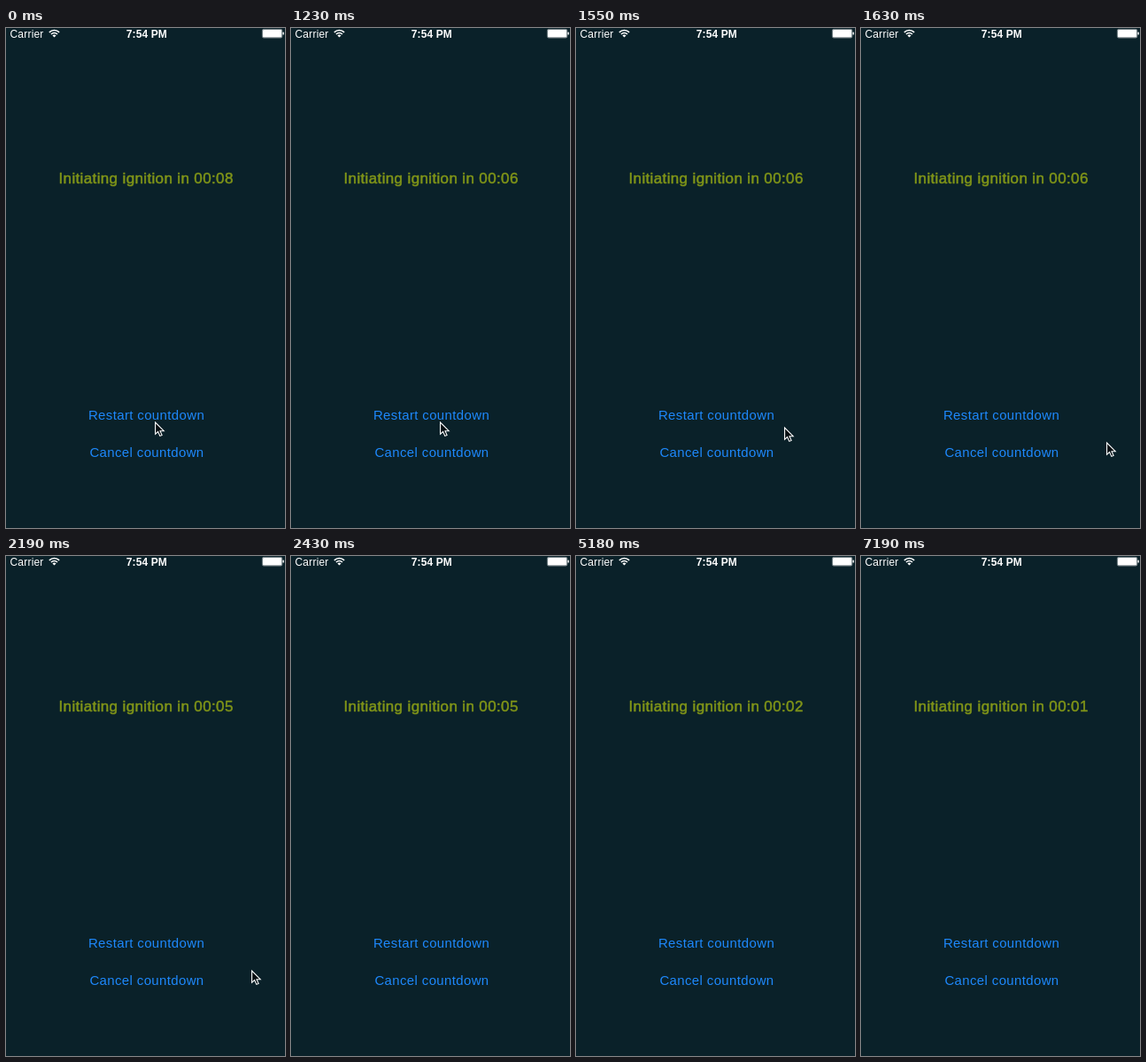
Recreate the animation shown at these times as an HTML page with a canvas. Size 315 by 563 pixels, loop 8 s.

```html
<!DOCTYPE html>
<html lang="en">
<head>
<meta charset="utf-8">
<title>Countdown</title>
<style>
html, body { margin: 0; width: 100%; height: 100%; overflow: hidden; background: #0a2129; }
canvas { display: block; width: 315px; height: 563px; }
</style>
</head>
<body>
<canvas id="stage"></canvas>
<script>
const W = 315, H = 563, LOOP = 8000;
const BG = '#0a2129', GREEN = '#809518', BLUE = '#1e88fb', WHITE = '#fff';
const SANS = '"Liberation Sans", Arial, sans-serif';

// [start ms, seconds left]
const counts = [[0, 8], [210, 7], [1230, 6], [2190, 5], [4200, 4], [5180, 2], [7190, 1]];
// [start ms, x, y]; no position once the pointer has left
const pointer = [
  [0, 168, 443], [1500, 188, 443], [1520, 213, 445], [1550, 235, 449],
  [1580, 254, 456], [1600, 268, 462], [1630, 277, 466], [2400, 296, 466], [2430]
];

const canvas = document.getElementById('stage');
const ctx = canvas.getContext('2d');
const scale = window.devicePixelRatio || 1;
canvas.width = W * scale;
canvas.height = H * scale;

const at = (steps, t) => steps.filter(s => s[0] <= t).pop();

function text(str, x, y, size, color, { weight = 400, spacing = 0, stroke = 0 } = {}) {
  ctx.font = `${weight} ${size}px ${SANS}`;
  ctx.letterSpacing = spacing + 'px';
  ctx.fillStyle = ctx.strokeStyle = color;
  ctx.fillText(str, x, y);
  if (stroke) {
    ctx.lineWidth = stroke;
    ctx.lineJoin = 'round';
    ctx.strokeText(str, x, y);
  }
}

function wifi(x, y) {
  const a = -Math.PI * 0.75, b = -Math.PI * 0.25;
  ctx.strokeStyle = ctx.fillStyle = WHITE;
  ctx.lineWidth = 1.6;
  for (const r of [5, 8]) {
    ctx.beginPath();
    ctx.arc(x, y, r, a, b);
    ctx.stroke();
  }
  ctx.beginPath();
  ctx.moveTo(x, y);
  ctx.arc(x, y, 2.9, a, b);
  ctx.fill();
}

function battery() {
  ctx.strokeStyle = 'rgba(255,255,255,0.6)';
  ctx.lineWidth = 0.8;
  ctx.beginPath();
  ctx.roundRect(289.4, 1.4, 22.4, 9.6, 1.6);
  ctx.stroke();
  ctx.fillStyle = WHITE;
  ctx.beginPath();
  ctx.roundRect(290, 2, 21.2, 8.4, 1);
  ctx.fill();
  ctx.beginPath();
  ctx.roundRect(312.4, 4.6, 1.4, 3.2, 0.7);
  ctx.fill();
}

function arrow(x, y) {
  ctx.save();
  ctx.translate(x, y);
  ctx.beginPath();
  ctx.moveTo(0.6, 1);
  ctx.lineTo(0.6, 14.3);
  ctx.lineTo(3.6, 11.5);
  ctx.lineTo(5.8, 16.4);
  ctx.lineTo(8.1, 15.4);
  ctx.lineTo(6, 10.7);
  ctx.lineTo(10.2, 10.7);
  ctx.closePath();
  ctx.fillStyle = '#050d11';
  ctx.fill();
  ctx.strokeStyle = WHITE;
  ctx.lineWidth = 1.1;
  ctx.lineJoin = 'miter';
  ctx.stroke();
  ctx.restore();
}

function draw(t) {
  ctx.setTransform(scale, 0, 0, scale, 0, 0);
  ctx.fillStyle = BG;
  ctx.fillRect(0, 0, W, H);

  text('Carrier', 4.5, 10.5, 12, WHITE, { spacing: 0.2 });
  wifi(54.5, 10.5);
  text('7:54 PM', 135.8, 10.5, 12, WHITE, { weight: 700, spacing: 0.1 });
  battery();

  text(`Initiating ignition in 00:0${at(counts, t)[1]}`, 59.5, 175, 17, GREEN,
    { spacing: 0.36, stroke: 0.5 });
  text('Restart countdown', 92.9, 441, 15, BLUE, { spacing: 0.36 });
  text('Cancel countdown', 94.4, 483, 15, BLUE, { spacing: 0.36 });

  const [, x, y] = at(pointer, t);
  if (x !== undefined) arrow(x, y);
}

const start = performance.now();
function frame() {
  draw((performance.now() - start) % LOOP);
  requestAnimationFrame(frame);
}
frame();
</script>
</body>
</html>
```
